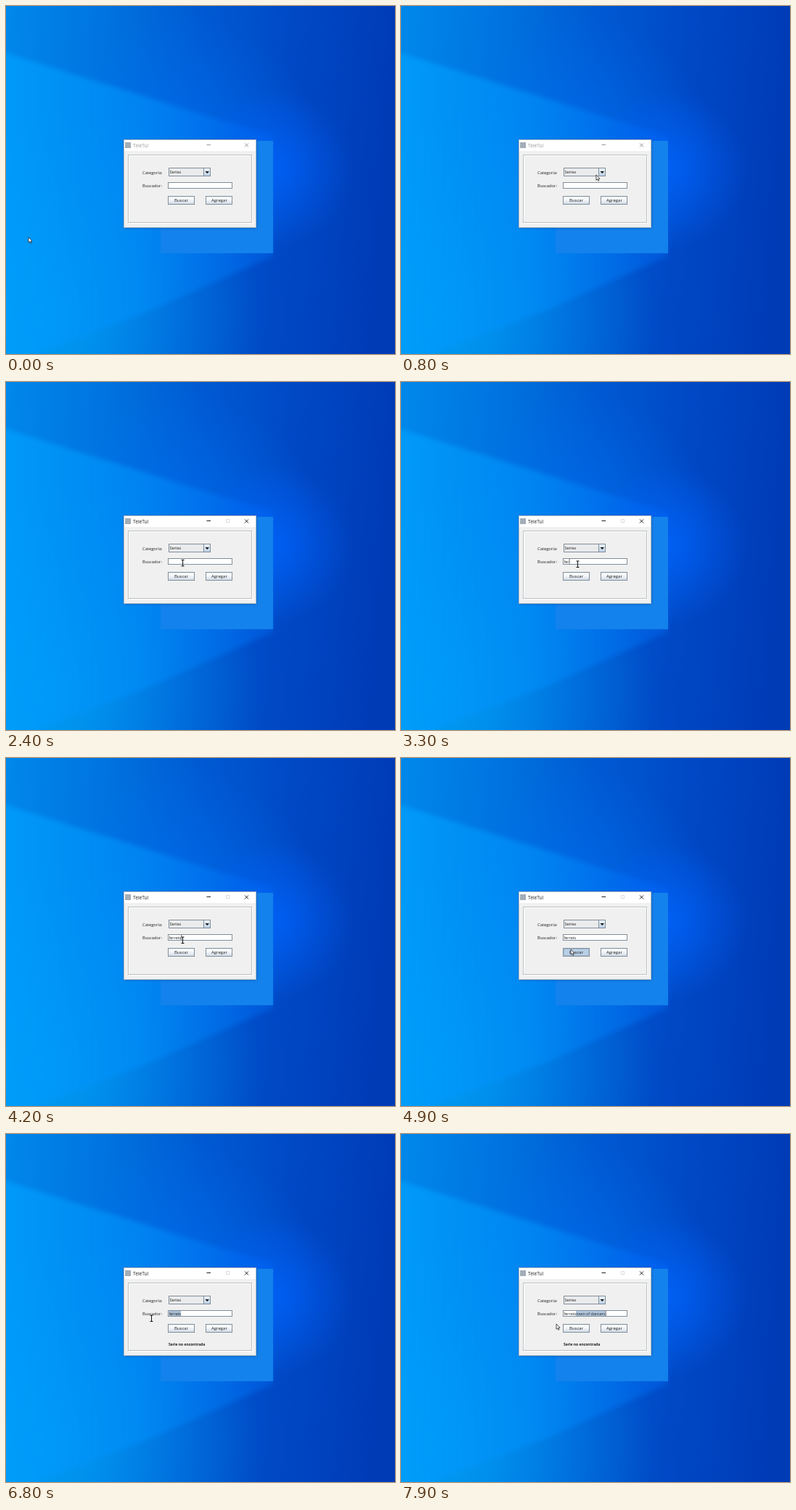
An HTML page with a canvas for the animation above (8 s loop, 536 by 480 pixels).

```html
<!DOCTYPE html>
<html lang="es">
<head>
<meta charset="utf-8">
<title>Buscador</title>
<style>
html, body { margin: 0; width: 100%; height: 100%; overflow: hidden; background: #0060d8; }
canvas { display: block; }
</style>
</head>
<body>
<canvas id="stage" width="536" height="480"></canvas>
<script>
const W = 536, H = 480, LOOP = 8000, MOVE = 450;
const ctx = document.getElementById('stage').getContext('2d');
const FIRST = 'ferrets', SECOND = 'town of dancers';
const BORDER = '#838f9b';

// Pointer stops: arrival time and place; every move takes MOVE ms
const stops = [
  { at: 0, x: 31, y: 319 },
  { at: 850, x: 277, y: 230 },
  { at: 1450, x: 244, y: 238 },
  { at: 2500, x: 243, y: 251 },
  { at: 4750, x: 234, y: 264 },
  { at: 6300, x: 243, y: 249 },
  { at: 6800, x: 200, y: 254 },
  { at: 7900, x: 214, y: 262 }
];
const within = (t, from, to) => t >= from && t < to;
const popupOpen = t => within(t, 1000, 1950);
const selecting = t => within(t, 6450, 7200);

function fill(color, x, y, w, h) {
  ctx.fillStyle = color;
  ctx.fillRect(x, y, w, h);
}

function frame(color, x, y, w, h) {
  ctx.strokeStyle = color;
  ctx.lineWidth = 1;
  ctx.strokeRect(x + .5, y + .5, w - 1, h - 1);
}

function text(str, x, y, size = 5.8, color = '#1c1c1c', weight = 400) {
  ctx.font = `${weight} ${size}px "Open Sans", sans-serif`;
  ctx.fillStyle = color;
  ctx.fillText(str, x, y);
}

function shape(points, color) {
  ctx.beginPath();
  points.forEach(([x, y]) => ctx.lineTo(x, y));
  ctx.closePath();
  ctx.fillStyle = color;
  ctx.fill();
}

function lines(color, ...segments) {
  ctx.strokeStyle = color;
  ctx.lineWidth = 1;
  ctx.beginPath();
  for (const [x1, y1, x2, y2] of segments) {
    ctx.moveTo(x1, y1);
    ctx.lineTo(x2, y2);
  }
  ctx.stroke();
}

function blend(grad, ...colors) {
  colors.forEach((c, i) => grad.addColorStop(i / (colors.length - 1), c));
  return grad;
}

function glow(x, y, r, rgb, alpha) {
  const g = ctx.createRadialGradient(x, y, 0, x, y, r);
  fill(blend(g, `rgba(${rgb},${alpha})`, `rgba(${rgb},0)`), 0, 0, W, H);
}

function wallpaper() {
  fill(blend(ctx.createLinearGradient(0, 0, W, 40),
    '#0088ea', '#0074e0', '#005ad3', '#0048c5', '#003bb6'), 0, 0, W, H);
  glow(240, 200, 190, '0,120,250', .5);
  glow(60, 430, 290, '0,170,248', .7);
  ctx.save();
  ctx.filter = 'blur(3px)';
  const beam = blend(ctx.createLinearGradient(0, 0, 368, 0),
    'rgba(0,158,252,.8)', 'rgba(0,140,246,.75)', 'rgba(0,102,238,.45)');
  shape([[-9, 62], [368, 180], [368, 345], [200, 420], [-9, 500]], beam);
  ctx.restore();
  glow(368, 225, 110, '0,100,255', .75);
  fill('#1482ec', 213, 186, 155, 155);
}

function button(label, x, labelX, pressed, hover) {
  const face = blend(ctx.createLinearGradient(0, 262, 0, 274),
    '#eaf0f5', '#fafcfd', '#e4eaf0', '#c6d6e6');
  fill(pressed ? '#b8cfe5' : face, x, 262, 37, 12);
  frame(BORDER, x, 262, 37, 12);
  if (hover) frame('#a3bad2', x + 1, 263, 35, 10);
  text(label, labelX, 270.2, 6);
}

function combo() {
  fill('#eaebec', 224, 223, 58, 12);
  fill(blend(ctx.createLinearGradient(0, 223, 0, 235), '#f4f8fc', '#b8cfe5'), 272, 223, 10, 12);
  frame(BORDER, 224, 223, 58, 12);
  lines(BORDER, [272.5, 223, 272.5, 235]);
  shape([[274.5, 228], [280, 228], [277.2, 231]], '#111');
  text('Series', 225.5, 231.2, 5.6);
}

function popup() {
  fill('#eee', 223, 235, 59, 28);
  fill('#a3b8cc', 224, 236, 57, 9);
  frame('#59646f', 223, 235, 59, 28);
  ['Series', 'Películas', 'Usuarios'].forEach((s, i) => text(s, 225, 242.3 + i * 9, 5.6));
}

function field(t) {
  const left = 224.5, size = 5.4;
  const typed = FIRST.slice(0, Math.max(0, Math.floor((t - 2850) / 150)));
  const pasted = t >= 7300 ? SECOND : '';
  fill('#fff', 223, 243, 89, 9);
  frame(BORDER, 223, 243, 89, 9);
  ctx.font = `${size}px "Open Sans", sans-serif`;
  const mid = left + ctx.measureText(typed).width;
  const end = mid + ctx.measureText(pasted).width;
  if (selecting(t)) {
    const from = Math.max(left, Math.min(mid, pointer(t).x));
    fill('#a9bfd6', from, 244, mid - from, 7);
  }
  fill('#b0c7df', mid, 244, end - mid, 7);
  text(typed + pasted, left, 249.9, size);
  if (within(t, 2600, 4800) || pasted) fill('#333', end + .2, 244, .7, 7);
}

function appWindow(t) {
  const active = t >= 900, ink = active ? '#222' : '#999';
  ctx.save();
  ctx.shadowColor = 'rgba(0,20,70,.35)';
  ctx.shadowBlur = 4;
  fill('#f0f0f0', 162.5, 184.5, 182.5, 121.5);
  ctx.restore();
  fill('#fff', 163, 185, 181, 15);
  frame('#a8b6c6', 162, 184, 183, 122);
  fill('#a3adb7', 164, 188, 8, 8);
  text('TeleTul', 175, 194.7, 6.6, ink);
  lines(ink, [276.5, 191.5, 282, 191.5], [329, 189.5, 334, 194.5], [334, 189.5, 329, 194.5]);
  if (active) frame('#dcdcdc', 303, 189, 5, 5);
  frame('#fff', 169, 206, 171, 94);
  frame('#bcc0c4', 168, 205, 171, 94);

  text('Categoría:', 188, 232);
  text('Buscador:', 188, 250.2);
  combo();
  field(t);
  button('Buscar', 223, 232, within(t, 4800, 5100), within(t, 4700, 6050));
  button('Agregar', 275, 283);
  if (t >= 5200) text('Serie no encontrada', 224, 292.2, 5, '#1c1c1c', 700);
  if (popupOpen(t)) popup();
}

function pointer(t) {
  const i = stops.findLastIndex(s => s.at <= t);
  const a = stops[i], b = stops[i + 1] || a;
  const u = Math.max(0, 1 - (b.at - t) / MOVE);
  const e = b === a ? 0 : u * u * (3 - 2 * u);
  return { x: a.x + (b.x - a.x) * e, y: a.y + (b.y - a.y) * e };
}

function drawPointer(t) {
  const { x, y } = pointer(t);
  const inField = within(x, 223, 312) && within(y, 243, 253);
  ctx.save();
  ctx.translate(x, y);
  if (selecting(t) || inField && !popupOpen(t)) {
    lines('#111', [.5, -4, .5, 4.5], [-1.5, -4, 2.5, -4], [-1.5, 4.5, 2.5, 4.5]);
  } else {
    ctx.scale(.9, .9);
    shape([[0, 0], [0, 8], [1.8, 6.4], [3.1, 9.2], [4.4, 8.6], [3.2, 5.9], [5.6, 5.8]], '#fff');
    ctx.strokeStyle = '#111';
    ctx.lineWidth = .8;
    ctx.stroke();
  }
  ctx.restore();
}

function draw(now) {
  const t = now % LOOP;
  wallpaper();
  appWindow(t);
  drawPointer(t);
  requestAnimationFrame(draw);
}
requestAnimationFrame(draw);
</script>
</body>
</html>
```
